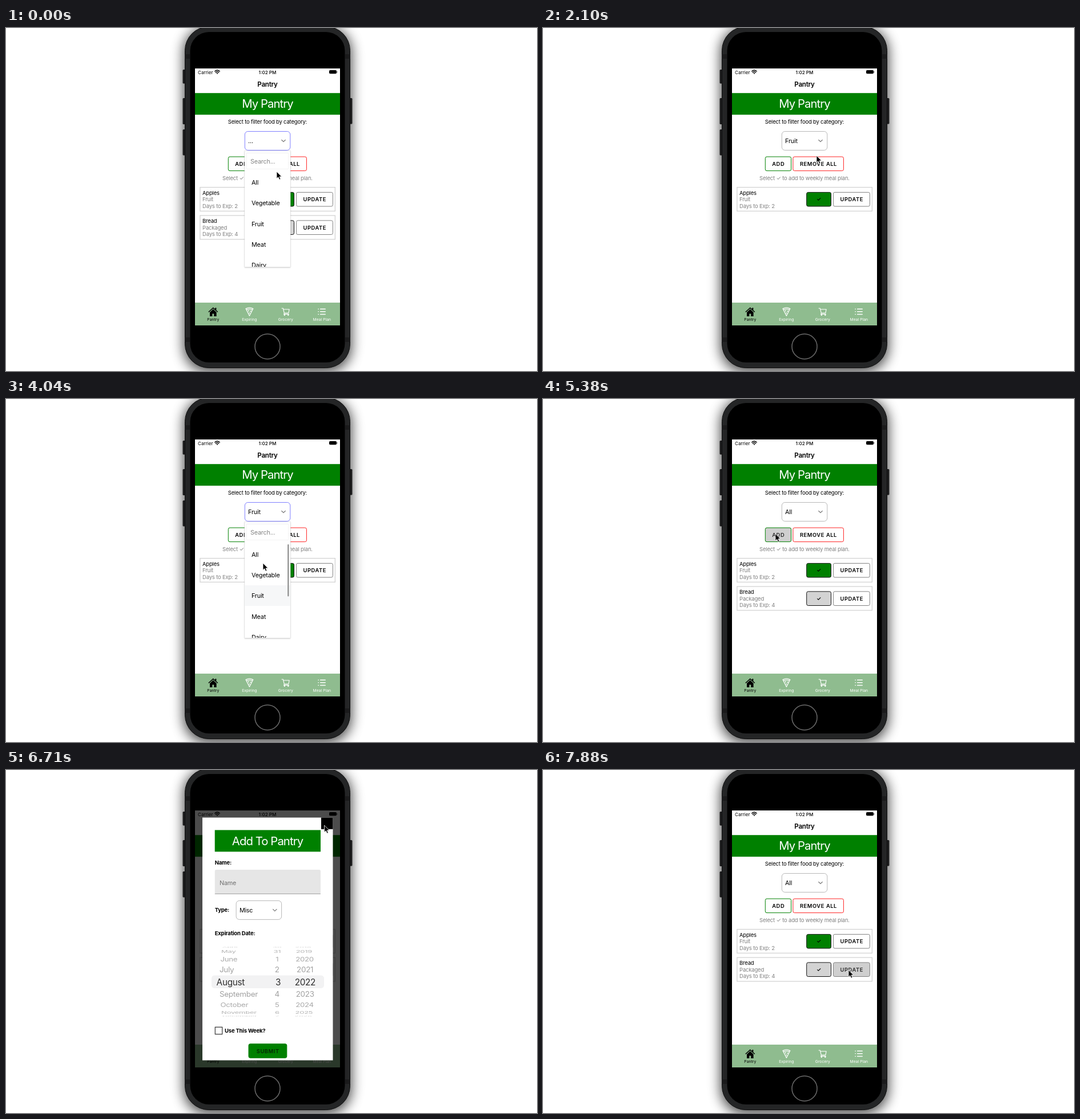
An HTML page that plays this animation: 930 px wide and 602 px high, repeating every 8 s.

```html
<!DOCTYPE html>
<html lang="en">
<head>
<meta charset="utf-8">
<title>Pantry app</title>
<style>
  html, body { margin: 0; width: 100%; height: 100%; overflow: hidden; background: #fff; }
  svg { display: block; width: 930px; height: 602px; }
  text { font-family: Inter, Roboto, sans-serif; letter-spacing: -.018em; white-space: pre; }
  .title { letter-spacing: -.045em; }
  .caps { letter-spacing: .6px; }
  .plain { letter-spacing: 0; }
</style>
</head>
<body>
<svg viewBox="0 0 930 602">
  <defs>
    <filter id="shadow" x="-30%" y="-30%" width="160%" height="160%"><feGaussianBlur stdDeviation="11"/></filter>
    <filter id="soft" x="-30%" y="-30%" width="160%" height="160%"><feGaussianBlur stdDeviation="1"/></filter>
    <clipPath id="screenClip"><rect x="331" y="71" width="254" height="451"/></clipPath>
    <clipPath id="listClip"><rect x="418" y="248" width="80" height="171"/></clipPath>
  </defs>
  <g id="phone"></g>
  <g id="screen" clip-path="url(#screenClip)"></g>
  <path id="cursor" d="M0 0V12.3L2.8 9.7 4.8 14.2 6.9 13.3 5 8.9H8.8Z" fill="#000" stroke="#fff" stroke-width=".8"/>
</svg>
<script>
const GREEN = '#008000', GRAY = '#808080', LIGHT = '#d3d3d3';
const LOOP = 8000, ROW = 36.2;
const $ = id => document.getElementById(id);

const rect = (x, y, x2, y2, fill, stroke = 'none', r = 0, w = 1) =>
  `<rect x="${x}" y="${y}" width="${x2 - x}" height="${y2 - y}" rx="${r}" fill="${fill}" stroke="${stroke}" stroke-width="${w}"/>`;
const text = (s, x, y, size = 9.48, fill = '#000', more = '') =>
  `<text x="${x}" y="${y}" font-size="${size}" fill="${fill}" ${more}>${s}</text>`;
const MID = 'text-anchor="middle" ';
const BOLD = 'font-weight="700" ';
const line = (d, stroke, w = 1) =>
  `<path d="${d}" fill="none" stroke="${stroke}" stroke-width="${w}" stroke-linecap="round" stroke-linejoin="round"/>`;

function button(label, x, y, x2, stroke, fill = '#fff', ink = '#000') {
  return rect(x, y, x2, y + 24.6, fill, stroke, 2.7) +
    text(label, (x + x2) / 2 + .3, y + 15.8, 9.3, ink, MID + 'font-weight="600" class="caps"');
}

function select(value, x, y, focused) {
  return rect(x, y, x + 79.5, y + 33, '#fff', focused ? '#7f7fff' : '#b8b8b8', 5.5) +
    text(value, x + 5.8, y + 20.6, 10.8) +
    line(`M${x + 64.5} ${y + 15}l3.2 3.2 3.2-3.2`, '#777', 1.2);
}

// Linear interpolation through [tick, ...values] keys.
function track(keys, tick) {
  const i = keys.findIndex(k => k[0] > tick);
  if (i < 0) return keys[keys.length - 1].slice(1);
  if (i === 0) return keys[0].slice(1);
  const [a, b] = [keys[i - 1], keys[i]];
  const p = (tick - a[0]) / (b[0] - a[0]);
  return a.slice(1).map((v, n) => v + (b[n + 1] - v) * p);
}

const cursorPath = [
  [0, 474, 252], [1, 472, 270], [3, 452, 353], [4, 450, 346], [9, 450, 346],
  [12, 490, 376], [13, 490, 376], [14, 479, 224], [17, 471, 191], [20, 471, 191],
  [23, 455, 270], [26, 451, 335], [27, 450, 288], [28, 441, 268], [31, 441, 268],
  [35, 407, 236.5], [39, 407, 236.5], [44, 557.5, 97], [47, 557.5, 97], [52, 535, 351]
];
const scrollPath = [[19, 0], [20, 72], [23, 72], [26, -6], [27, -1.7], [28, 0]];
const modalPath = [[36, 451, 0], [37, 150, .45], [38, 10, .7], [39, 0, .7], [45, 0, .7], [46, 150, .3], [47, 425, 0]];

function phone() {
  const side = (x, y, y2) => rect(x, y, x + 5, y2, '#1c1c1d', 'none', 1.5);
  return `<g filter="url(#shadow)" opacity=".72">${rect(311, -2, 605, 604, '#000', 'none', 44)}</g>` +
    side(309.5, 73, 97.5) + side(309.5, 123, 169) + side(309.5, 178, 223.5) + side(601.5, 123, 168.5) +
    rect(313.5, -2.5, 602.5, 596.5, '#242526', '#0c0c0c', 42) +
    [46, 543].map(y => rect(313, y, 322, y + 8, '#1a1a1b') + rect(594, y, 603, y + 8, '#1a1a1b')).join('') +
    rect(322.5, 7, 593.5, 587, '#000', 'none', 33) +
    '<circle cx="458" cy="559" r="22" fill="#000" stroke="#6b6b6b" stroke-width="1.5"/>';
}

function statusBar() {
  return text('Carrier', 336, 80.8, 8.1, '#000', 'class="plain"') +
    text('1:02 PM', 458, 80.8, 8.1, '#000', MID + 'font-weight="500" class="plain"') +
    line('M365.8 76Q370 72.2 374.2 76M367.3 78Q370 75.6 372.7 78', '#000', 1.4) +
    '<path d="M368.4 79.3Q370 78 371.6 79.3L370 81Z"/>' +
    rect(566, 74, 579, 80.3, '#000', 'none', 1.8) + rect(579.6, 76, 580.6, 78.4, '#555', 'none', .5);
}

function tabBar() {
  const labels = ['Pantry', 'Expiring', 'Grocery', 'Meal Plan'];
  return rect(331, 482, 585, 522, '#8fbc8f') +
    labels.map((s, i) => text(s, 362.8 + 63.5 * i, 513.6, 6.8, i ? '#fff' : '#000', MID + 'class="plain"')).join('') +
    '<path d="M362.8 490.2L354.3 498l1 1.1 7.5-6.8 7.5 6.8 1-1.1-3-2.8V491h-2v2.3Z"/>' +
    '<path d="M362.8 493.6L357 498.9V506h4.3v-4.6h3V506h4.3v-7.1Z"/>' +
    line('M420 492.6Q426.4 489.2 432.8 492.6L426.4 505.2ZM421.2 494.6Q426.4 492 431.6 494.6', '#fff', 1.2) +
    '<g fill="#fff"><circle cx="424.8" cy="496.4" r="1.1"/><circle cx="428.4" cy="497" r="1.1"/><circle cx="426.3" cy="500.2" r="1"/></g>' +
    line('M483 492h2.3l2 8.4h7.5l1.3-6.6h-10.3M487.3 500.4l-.6 2h8.6', '#fff', 1.1) +
    '<g fill="#fff"><circle cx="487.8" cy="503.8" r="1.2"/><circle cx="494.3" cy="503.8" r="1.2"/></g>' +
    [493.2, 497.8, 502.4].map(y => line(`M547 ${y}h.3M550.6 ${y}h8.6`, '#fff', 1.5)).join('');
}

function card(y, name, kind, days, checkFill, pressed) {
  return rect(339.9, y, 576.4, y + 41.8, '#fff', LIGHT, 0, 1.3) +
    text(name, 344, y + 13) + text(kind, 344, y + 24.6, 9.48, GRAY) +
    text('Days to Exp: ' + days, 344, y + 36, 9.48, GRAY) +
    button('✓', 461.7, y + 8.8, 504.5, '#111', checkFill) +
    button('UPDATE', 508.4, y + 8.8, 572.4, '#808080', pressed ? '#cfcfcf' : '#fff', pressed ? '#2b2b2b' : '#000');
}

function dropdown(tick, value) {
  const [scroll] = track(scrollPath, tick);
  const pressed = tick === 29 ? 'All' : tick >= 4 && tick < 7 ? 'Fruit' : '';
  const rows = ['All', 'Vegetable', 'Fruit', 'Meat', 'Dairy', 'Packaged', 'Grain', 'Misc'].map((s, i) => {
    const y = 253 + ROW * i - scroll;
    const fill = s === value || s === pressed ? '#f6f7f8' : '#fff';
    return rect(418.5, y, 497.5, y + ROW, fill) + text(s, 430, y + 22.2, 10.8, s === pressed ? '#262626' : '#000');
  }).join('');
  const barY = 255 + Math.max(0, scroll) * .56;
  return `<g filter="url(#soft)" opacity=".3">${rect(418, 216, 498, 420.3, '#000')}</g>` +
    rect(418, 215.5, 498, 419.5, '#fff', '#e6e6e6', 0, .7) +
    rect(421.5, 219.5, 494.5, 247.5, '#fff', '#eee', 0, .7) +
    text('Search...', 428, 238, 10.8, '#858585') +
    `<g clip-path="url(#listClip)">${rows}</g>` +
    (tick >= 20 ? rect(493.2, barY, 495.4, barY + 91.5, '#8c8c8c', 'none', 1.1) : '');
}

function pantry(tick) {
  const open = tick < 7 || (tick >= 19 && tick < 30);
  const value = tick < 7 ? '...' : tick < 30 ? 'Fruit' : 'All';
  const adding = tick === 36 || tick === 37;
  return rect(331, 71, 585, 522, '#fff') + statusBar() +
    text('Pantry', 458, 103.2, 11.5, '#000', MID + 'font-weight="600"') +
    rect(331, 114.2, 585, 152.2, GREEN) +
    text('My Pantry', 458, 140.4, 20.3, '#fff', MID + 'class="title"') +
    text('Select to filter food by category:', 458, 167.8, 9.48, '#000', MID) +
    select(value, 418.3, 181.5, open) +
    button('ADD', 389.3, 226, 434.6, GREEN, adding ? '#cfcfcf' : '#fff', adding ? '#2b2b2b' : '#000') +
    button('REMOVE ALL', 437.9, 226, 526.4, '#f22') +
    text('Select ✓ to add to weekly meal plan.', 458, 266.9, 9.48, GRAY, MID) +
    card(279.6, 'Apples', 'Fruit', 2, GREEN) +
    (value === 'Fruit' ? '' : card(329.1, 'Bread', 'Packaged', 4, LIGHT, tick === 53)) +
    tabBar() + (open ? dropdown(tick, value) : '');
}

// Rows sit on a turning cylinder, so they flatten towards its edges.
function datePicker() {
  const months = ['April', 'May', 'June', 'July', 'August', 'September', 'October', 'November', 'December'];
  const inks = ['#2e2e2e', '#a0a0a0', '#a8a8a8', '#b4b4b4', '#d8d8d8'];
  const rows = months.map((month, i) => {
    const k = i - 4, far = Math.abs(k), angle = k * 20.5 * Math.PI / 180;
    const y = 372 + 61 * Math.sin(angle);
    const size = far ? 13.6 : 15.3;
    const cell = (s, x, more) => `<g transform="translate(${x} ${y}) scale(${1 - .015 * far} ${Math.cos(angle)})">` +
      text(s, 0, size * .36, size, inks[far], more) + '</g>';
    return cell(month, far ? 372.3 + 1.6 * far : 368.6, '') +
      cell((i + 30) % 31 + 0 || 31, far ? 474.8 : 476.5, MID) +
      cell(2022 + k, 523.9 - .22 * far * far, MID);
  });
  return rect(360, 360.6, 557, 383, '#f2f2f3', 'none', 5) + rows.join('');
}

function modal(closing) {
  return rect(344, 83.5, 572.5, 509.5, '#fff') +
    rect(552, 83.5, 572.5, 103.8, closing ? '#000' : LIGHT) +
    text('X', 562.1, 97.2, 9.48, '#000', MID) +
    rect(365.7, 105.4, 551, 143.4, GREEN) +
    text('Add To Pantry', 458, 131.7, 20.3, '#fff', MID + 'class="title"') +
    text('Name:', 365.7, 165.7, 9.48, '#000', BOLD) +
    rect(365.7, 175, 551, 217.6, '#e6e6e6', 'none', 2.7) + rect(365.7, 216.9, 551, 217.7, '#8a8a8a') +
    text('Name', 374, 201.7, 10.8, '#707070') +
    text('Type:', 365.7, 249.2, 9.48, '#000', BOLD) + select('Misc', 403.1, 229.4) +
    text('Expiration Date:', 365.7, 289.6, 9.48, '#000', BOLD) + datePicker() +
    rect(366.3, 451.3, 378.7, 463.7, '#fff', '#333', 0, 1.2) +
    text('Use This Week?', 383, 461, 9.48, '#000', BOLD) +
    button('SUBMIT', 425, 480.7, 491.8, GREEN, GREEN, '#062406');
}

function render(tick) {
  let markup = pantry(tick);
  if (tick > 36 && tick < 48) {
    const [shift, shade] = track(modalPath, tick);
    markup += `<g opacity="${shade}">${rect(331, 71, 585, 522, '#000')}</g>` +
      `<g transform="translate(0 ${shift})">${modal(tick >= 45)}</g>`;
  }
  $('screen').innerHTML = markup;
  $('cursor').setAttribute('transform', `translate(${track(cursorPath, tick)})`);
}

const tickAt = t => t < 3450 ? Math.floor(t / 150) : 23 + Math.floor((t - 3442) / 147.67);

$('phone').innerHTML = phone();
let shown = -1;
const start = performance.now();
function frame() {
  const tick = Math.min(53, tickAt((performance.now() - start) % LOOP));
  if (tick !== shown) render(shown = tick);
  requestAnimationFrame(frame);
}
frame();
</script>
</body>
</html>
```
